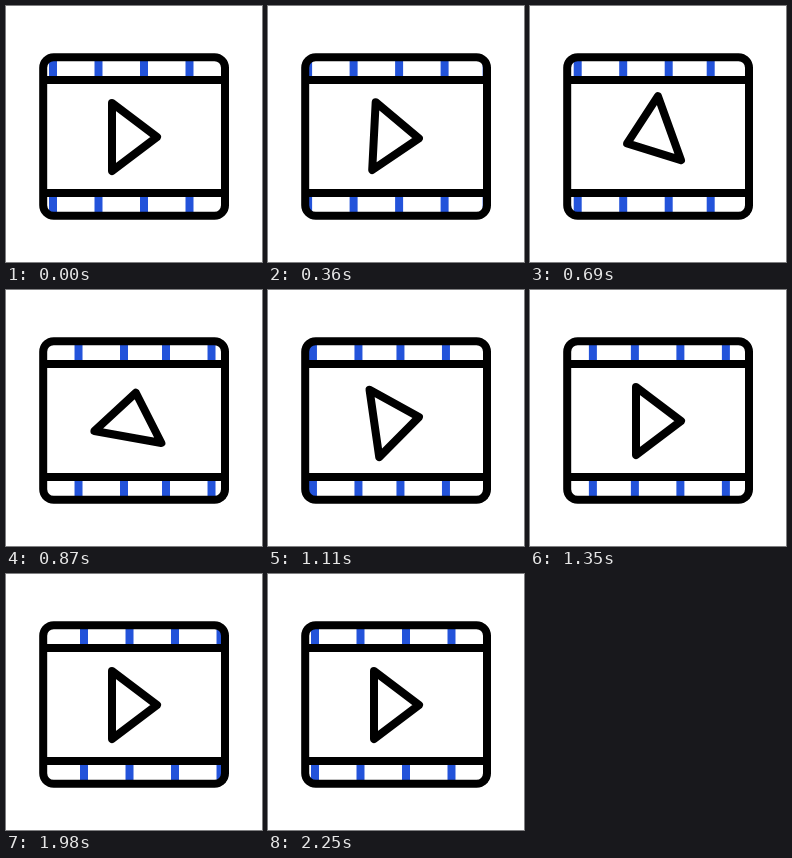
An HTML page that plays this animation: 256 by 256 pixels, repeating every 2.28 s.

```html
<!DOCTYPE html>
<html lang="en">
<head>
<meta charset="utf-8">
<title>Film strip</title>
<style>
  html, body { margin: 0; width: 100%; height: 100%; overflow: hidden; background: #fff; }
  svg { display: block; width: 100vw; height: 100vh; }
</style>
</head>
<body>
<svg viewBox="0 0 256 256">
  <clipPath id="inside"><rect x="37.2" y="51.2" width="181.8" height="158.6" rx="10.5"/></clipPath>
  <g clip-path="url(#inside)">
    <path id="bars" fill="none" stroke="#2353da" stroke-width="8"/>
  </g>
  <g fill="none" stroke="#000" stroke-width="8" stroke-linejoin="round">
    <rect x="37.2" y="51.2" width="181.8" height="158.6" rx="10.5"/>
    <path d="M37 74H219M37 187H219"/>
    <path id="play" d="M106 97L151 131L106 165Z"/>
  </g>
</svg>
<script>
  const LOOP = 2280, STEP = 30, START = 300;
  const SLIDE = 1950, TRAVEL = 224, GAP = 45.5, FIRST = 47;
  const SPIN = 945;
  const bars = document.getElementById('bars');
  const play = document.getElementById('play');

  // Two runs of bars; the second follows at a slightly narrower gap.
  const xs = [];
  for (let i = 0; i < 4; i++) xs.push(FIRST + i * GAP);
  for (let i = 0; i < 5; i++) xs.push(FIRST + TRAVEL + (i - 1) * GAP);
  bars.setAttribute('d', xs.map(x => `M${x} 51V74M${x} 187V210`).join(''));

  const clamp = v => Math.min(1, Math.max(0, v));

  // cubic-bezier(.42, 0, .42, 1), solved by bisection
  function ease(x) {
    let lo = 0, hi = 1;
    for (let i = 0; i < 24; i++) {
      const u = (lo + hi) / 2;
      if (1.26 * u * (1 - u) + u ** 3 < x) lo = u; else hi = u;
    }
    return lo * lo * (3 - 2 * lo);
  }

  function draw(now) {
    const t = Math.floor(now % LOOP / STEP) * STEP - START;
    const turn = t <= 0 || t >= SPIN ? 0 : 360 * ease(t / SPIN);
    bars.setAttribute('transform', `translate(${-TRAVEL * clamp(t / SLIDE)} 0)`);
    play.setAttribute('transform', `rotate(${turn} 123.5 129.5)`);
  }

  const begin = performance.now();
  function frame() {
    draw(performance.now() - begin);
    requestAnimationFrame(frame);
  }
  frame();
</script>
</body>
</html>
```
